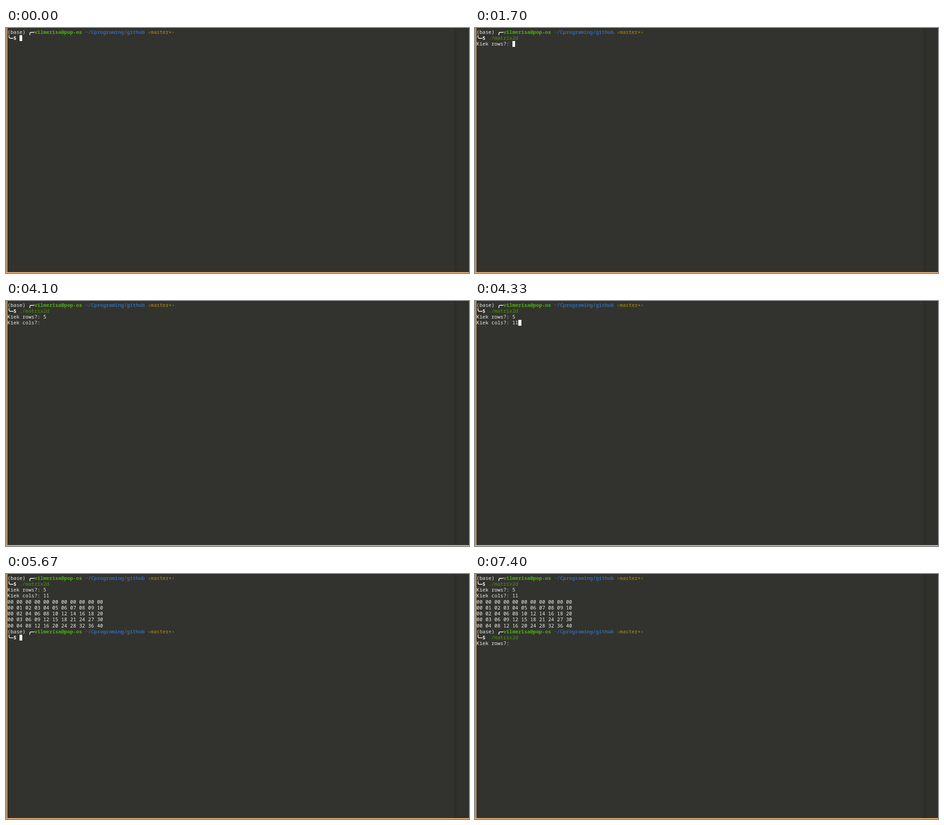
Animation, 1027 px wide and 545 px high, one loop 8 s. Source, as an HTML page with a canvas:

```html
<!DOCTYPE html>
<html lang="en">
<head>
<meta charset="utf-8">
<title>Terminal</title>
<style>
  html, body { margin: 0; width: 100%; height: 100%; overflow: hidden; background: #32332e; }
  canvas { display: block; }
</style>
</head>
<body>
<canvas id="stage" width="1027" height="545"></canvas>
<script>
const ctx = document.getElementById('stage').getContext('2d');
const LOOP = 8000;
const CELL = 6.62, LINE = 13.24, LEFT = 3.3, TOP = 2.4;
const FONT = '11.03px "Noto Sans Mono", "DejaVu Sans Mono", monospace';
const WHITE = '#eeeeea', GREEN = '#4e9a06', BRIGHT = '#4fae12', BLUE = '#3566a8', YELLOW = '#b8900c';
const COMMAND = './matrix2d';

const colX = col => LEFT + col * CELL;
const rowY = row => TOP + row * LINE;

function text(row, col, str, color = WHITE, bold = false) {
  ctx.font = (bold ? 'bold ' : '') + FONT;
  ctx.fillStyle = color;
  [...str].forEach((ch, i) => {
    const drop = ch === '*' ? 2 : 0;
    if (ch !== ' ') ctx.fillText(ch, colX(col + i), rowY(row) + 10.3 + drop);
  });
}

function cursor(row, col) {
  const x = Math.round(colX(col)), y = Math.round(rowY(row));
  ctx.fillStyle = '#f8f8f2';
  ctx.fillRect(x, y, Math.round(colX(col + 1)) - x, Math.round(rowY(row + 1)) - y);
}

// Rounded corner of the two-line prompt, with its arm running right
function corner(row, col, edgeY) {
  const x = colX(col + 0.5), y = rowY(row) + 7.2;
  ctx.strokeStyle = WHITE;
  ctx.lineWidth = 1.6;
  ctx.beginPath();
  ctx.moveTo(x, edgeY);
  ctx.arcTo(x, y, x + 4, y, 3);
  ctx.lineTo(colX(col + 2), y);
  ctx.stroke();
}

function prompt(row, command) {
  text(row, 0, '(base)');
  corner(row, 7, rowY(row + 1));
  text(row, 9, 'vilmerisa@pop-os', BRIGHT, true);
  text(row, 26, '~/Cprograming/github', BLUE, true);
  text(row, 47, '‹master*›', YELLOW);
  corner(row + 1, 0, rowY(row + 1));
  text(row + 1, 2, '$', WHITE, true);
  text(row + 1, 4, command, GREEN);
}

function table(row, rows, cols) {
  for (let i = 0; i < rows; i++)
    for (let j = 0; j < cols; j++)
      text(row + i, j * 3, String(i * j).padStart(2, '0'));
}

function frame() {
  ctx.fillStyle = '#32332e';
  ctx.fillRect(0, 0, 1027, 545);
  ctx.fillStyle = '#2b2c27';
  ctx.fillRect(0, 0, 1027, 1);
  const shade = ctx.createLinearGradient(994, 0, 1003, 0);
  shade.addColorStop(0, '#2b2c28');
  shade.addColorStop(1, '#30312c');
  ctx.fillStyle = shade;
  ctx.fillRect(995, 1, 32, 544);
  ctx.fillStyle = '#55524a';
  ctx.fillRect(0, 0, 1, 545);
  ctx.fillStyle = '#edb274';
  ctx.fillRect(1, 0, 2, 545);
  ctx.fillRect(0, 543, 1027, 2);
}

// Each entry: start time, cursor row and column (no cursor when omitted)
const cursorSteps = [
  [0, 1, 4], [170], [370, 1, 4], [470, 1, 9], [970], [1070, 1, 9], [1100, 1, 14],
  [1700, 2, 12], [2270], [2870, 2, 12], [3500, 2, 13], [3530, 3, 12], [4100],
  [4130, 3, 12], [4170, 3, 13], [4330, 3, 14], [4530, 10, 4], [5070], [5670, 10, 4],
  [6500, 10, 14], [6700], [6770, 11, 0], [6830, 11, 12], [7400]
];

function draw(t) {
  frame();
  prompt(0, t < 470 ? '' : t < 1100 ? 'clear' : COMMAND);
  if (t >= 1700) text(2, 0, 'Kiek rows?: ' + (t >= 3500 ? '5' : ''));
  if (t >= 3530) text(3, 0, 'Kiek cols?: ' + (t >= 4330 ? '11' : t >= 4170 ? '1' : ''));
  if (t >= 4530) {
    table(4, 5, 11);
    prompt(9, t >= 6500 ? COMMAND : '');
  }
  if (t >= 6830) text(11, 0, 'Kiek rows?:');

  const [, row, col] = cursorSteps.filter(step => step[0] <= t).pop();
  if (row !== undefined) cursor(row, col);
}

const start = performance.now();
function tick() {
  draw((performance.now() - start) % LOOP);
  requestAnimationFrame(tick);
}
tick();
</script>
</body>
</html>
```
